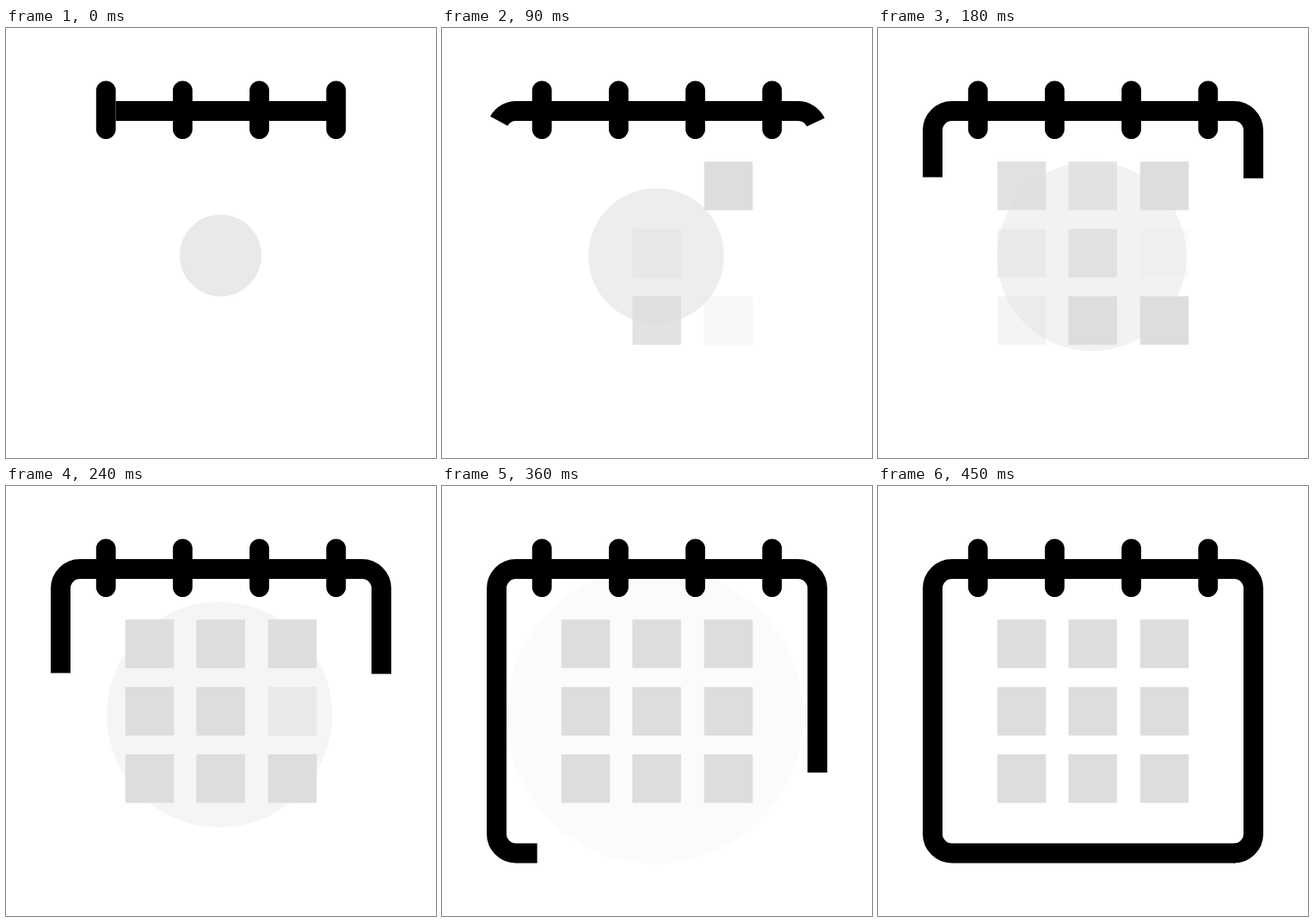
Write an HTML page with a canvas that moves like this. It is 500 px wide and 500 px high and loops after 0.78 s.

```html
<!DOCTYPE html>
<html lang="en">
<head>
<meta charset="utf-8">
<title>Calendar</title>
<style>
  html, body { margin: 0; width: 100%; height: 100%; overflow: hidden; background: #fff; }
  canvas { display: block; }
</style>
</head>
<body>
<canvas id="stage" width="500" height="500"></canvas>
<script>
const ctx = document.getElementById('stage').getContext('2d');
const LOOP = 780, END = 450, STEP = 30;

// Fade-in [start, duration] of each day, row by row
const fades = [
  [120, 70], [90, 120], [0, 55],
  [150, 75], [18, 210], [160, 160],
  [155, 80], [30, 72], [75, 70]
];
const columns = [138.8, 221.4, 304.8], rows = [155.3, 233.7, 311.9];

const clamp = v => Math.max(0, Math.min(1, v));

// Linear from a to b until 300 ms, then linear to c at the end
const twoPhase = (t, a, b, c) =>
  t < 300 ? a + (b - a) * t / 300 : b + (c - b) * (t - 300) / (END - 300);

function drawCircle(t) {
  ctx.globalAlpha = 0.65 * (1 - t / END);
  ctx.fillStyle = '#ddd';
  ctx.beginPath();
  ctx.arc(249.5 - 0.0055 * t, 264.5 + 0.006 * t, 47.5 + 0.3483 * t, 0, 2 * Math.PI);
  ctx.fill();
}

function drawDays(t) {
  ctx.fillStyle = '#ddd';
  fades.forEach(([start, duration], i) => {
    ctx.globalAlpha = clamp((t - start) / duration);
    ctx.fillRect(columns[i % 3], rows[Math.floor(i / 3)], 56.5, 56.5);
  });
  ctx.globalAlpha = 1;
}

// Border from the top centre around one side; side is 1 (right) or -1 (left)
function drawBorder(side, length) {
  ctx.save();
  ctx.translate(250, 0);
  ctx.scale(side, 1);
  ctx.lineWidth = 23;
  ctx.lineCap = 'butt';
  ctx.setLineDash([length, 2000]);
  ctx.beginPath();
  ctx.moveTo(0, 96.5);
  ctx.arcTo(186.5, 96.5, 186.5, 427, 22.5);
  ctx.arcTo(186.5, 427, 0, 427, 22.5);
  ctx.lineTo(-166, 427);
  ctx.stroke();
  ctx.restore();
}

function drawRings() {
  ctx.lineWidth = 22.8;
  ctx.lineCap = 'round';
  ctx.beginPath();
  for (let i = 0; i < 4; i++) {
    const x = 116.2 + i * 89.2;
    ctx.moveTo(x, 72.9);
    ctx.lineTo(x, 117.6);
  }
  ctx.stroke();
}

function draw(now) {
  const t = Math.min(END, Math.floor(now % LOOP / STEP) * STEP);
  ctx.clearRect(0, 0, 500, 500);
  drawCircle(t);
  drawDays(t);
  drawBorder(1, twoPhase(t, 124, 342.3, 520));
  drawBorder(-1, twoPhase(t, 122.3, 341.3, 849));
  drawRings();
}

let origin;
function tick(now) {
  origin ??= now;
  draw(now - origin);
  requestAnimationFrame(tick);
}
draw(0);
requestAnimationFrame(tick);
</script>
</body>
</html>
```
